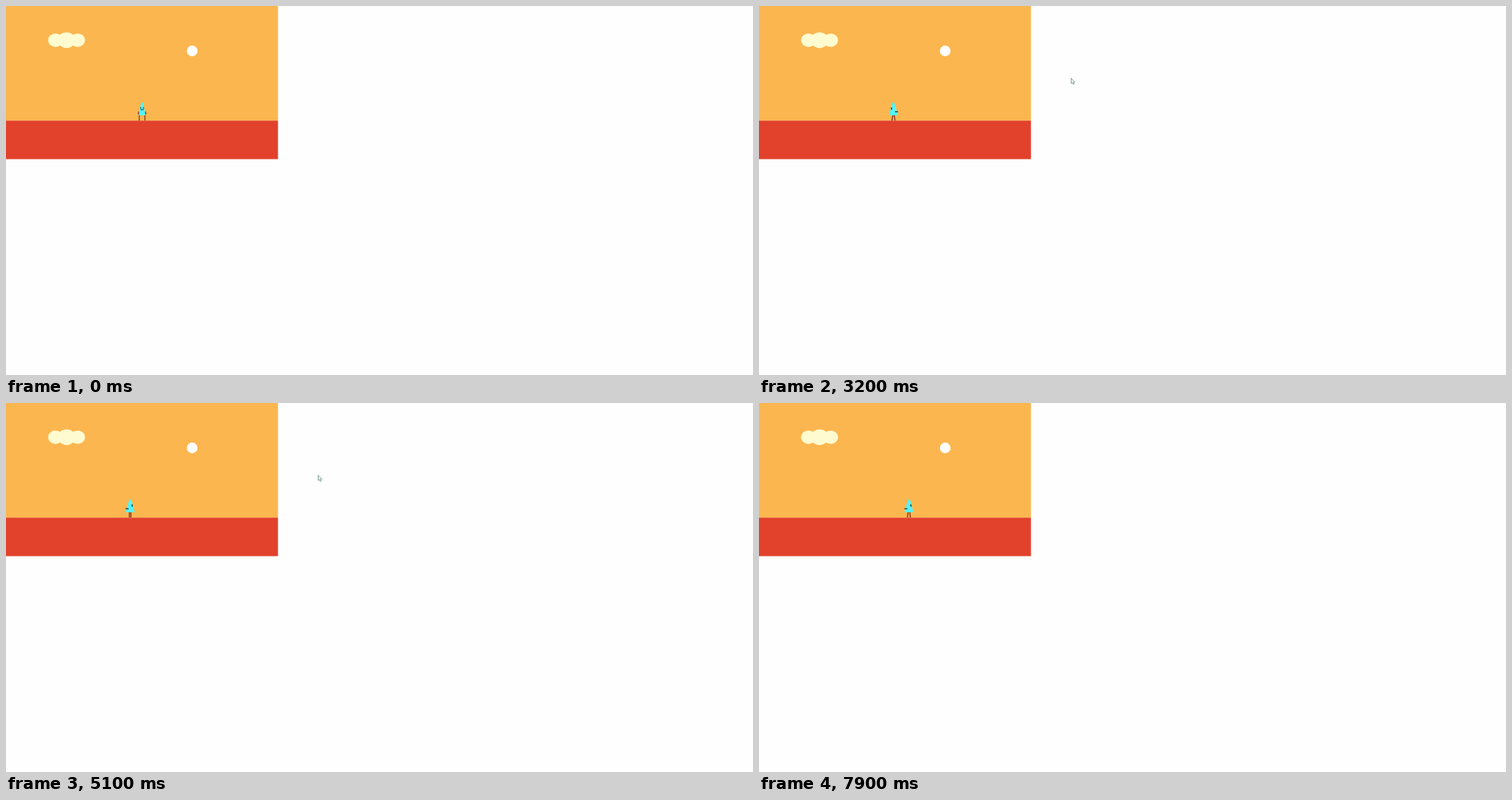
These frames come from a looping animation (999 px wide and 493 px high, 8 s). An HTML page with a canvas:

```html
<!DOCTYPE html>
<html lang="en">
<head>
<meta charset="utf-8">
<title>Little walker</title>
<style>
  html, body { margin: 0; width: 100%; height: 100%; overflow: hidden; background: #fefefe; }
  canvas { display: block; }
</style>
</head>
<body>
<canvas id="stage" width="999" height="493"></canvas>
<script>
const ctx = document.getElementById('stage').getContext('2d');
const LOOP = 8000, STEP = 100;
const CYAN = '#55f3f6', DARK = '#17232b', LEG = '#7c2a25';
const HOME = 182, STRIDE = 13.5;

// Each walk covers its distance at a steady pace
const walks = [
  { start: 3100, end: 4000, distance: -19 },
  { start: 4000, end: 4300, distance: -3 },
  ...[4700, 5900, 7000].map(start => ({ start, end: start + 900, distance: STRIDE }))
];

const progress = (t, start, end) => Math.min(1, Math.max(0, (t - start) / (end - start)));
const mix = (a, b, p) => a + (b - a) * p;

function rect(color, x, y, w, h) {
  ctx.fillStyle = color;
  ctx.fillRect(x, y, w, h);
}

function oval(color, x, y, rx, ry = rx) {
  ctx.fillStyle = color;
  ctx.beginPath();
  ctx.ellipse(x, y, rx, ry, 0, 0, Math.PI * 2);
  ctx.fill();
}

function trace(d, fill, stroke, width = 1) {
  const path = new Path2D(d);
  if (fill) {
    ctx.fillStyle = fill;
    ctx.fill(path);
  }
  if (stroke) {
    ctx.strokeStyle = stroke;
    ctx.lineWidth = width;
    ctx.stroke(path);
  }
}

function scene() {
  rect('#fefefe', 0, 0, 999, 493);
  rect('#fcb64f', 0, 0, 363.7, 153.2);
  rect('#e2412b', 0, 153.2, 363.7, 51.4);
  for (const side of [-1, 1]) oval('#fefbd0', 81 + side * 14.8, 45.7, 10, 9);
  oval('#fefbd0', 81, 45.7, 12, 10.5);
  oval('#fff', 249, 60, 7.2);
}

// Both poses stand on y = 0
function frontPose() {
  trace('M-1 -24H1L5 -7H-5Z', CYAN);
  for (const side of [-1, 1]) {
    rect(LEG, side * 3.8 - .6, -7, 1.2, 7);
    rect(LEG, side * 4.8 - .6, -12, 1.2, 4);
    rect(DARK, side * 1.9 - .6, -17.5, 1.2, 1.6);
  }
  trace('M-2 -15Q0 -13 2 -15', null, DARK);
}

// Faces right
function sidePose(swing) {
  for (const side of [-1, 1]) trace(`M${side} -7L${side * (1 + swing)} 0`, null, LEG, 1.3);
  trace('M-1 -24H1.5L6 -7H-6Z', CYAN);
  trace('M-6 -11.7H-2', null, DARK, 1.2);
  rect(DARK, 2, -17.5, 1.3, 3);
}

function walker(t) {
  const x = walks.reduce((sum, w) => sum + w.distance * progress(t, w.start, w.end), HOME);
  const last = walks.findLast(w => t > w.start);
  ctx.save();
  ctx.translate(x, 153);
  if (last) {
    ctx.scale(Math.sign(last.distance), 1);
    sidePose(t <= last.end ? Math.sin((t - last.start) / 200 * Math.PI) : 0);
  } else {
    frontPose();
  }
  ctx.restore();
}

function pointer(t) {
  if (t < 2200 || t >= 6000) return;
  const p = progress(t, 2200, 2500);
  ctx.save();
  ctx.translate(mix(472, 417, p) + .5, mix(68, 96, p) + .5);
  trace('M0 0V7L1.6 5.7L2.8 8.3L4 7.8L2.9 5.3H5Z', '#fff', '#5f9084', .8);
  ctx.restore();
}

function draw(now) {
  const t = Math.floor(now % LOOP / STEP) * STEP;
  scene();
  walker(t);
  pointer(t);
  requestAnimationFrame(draw);
}
requestAnimationFrame(draw);
</script>
</body>
</html>
```
